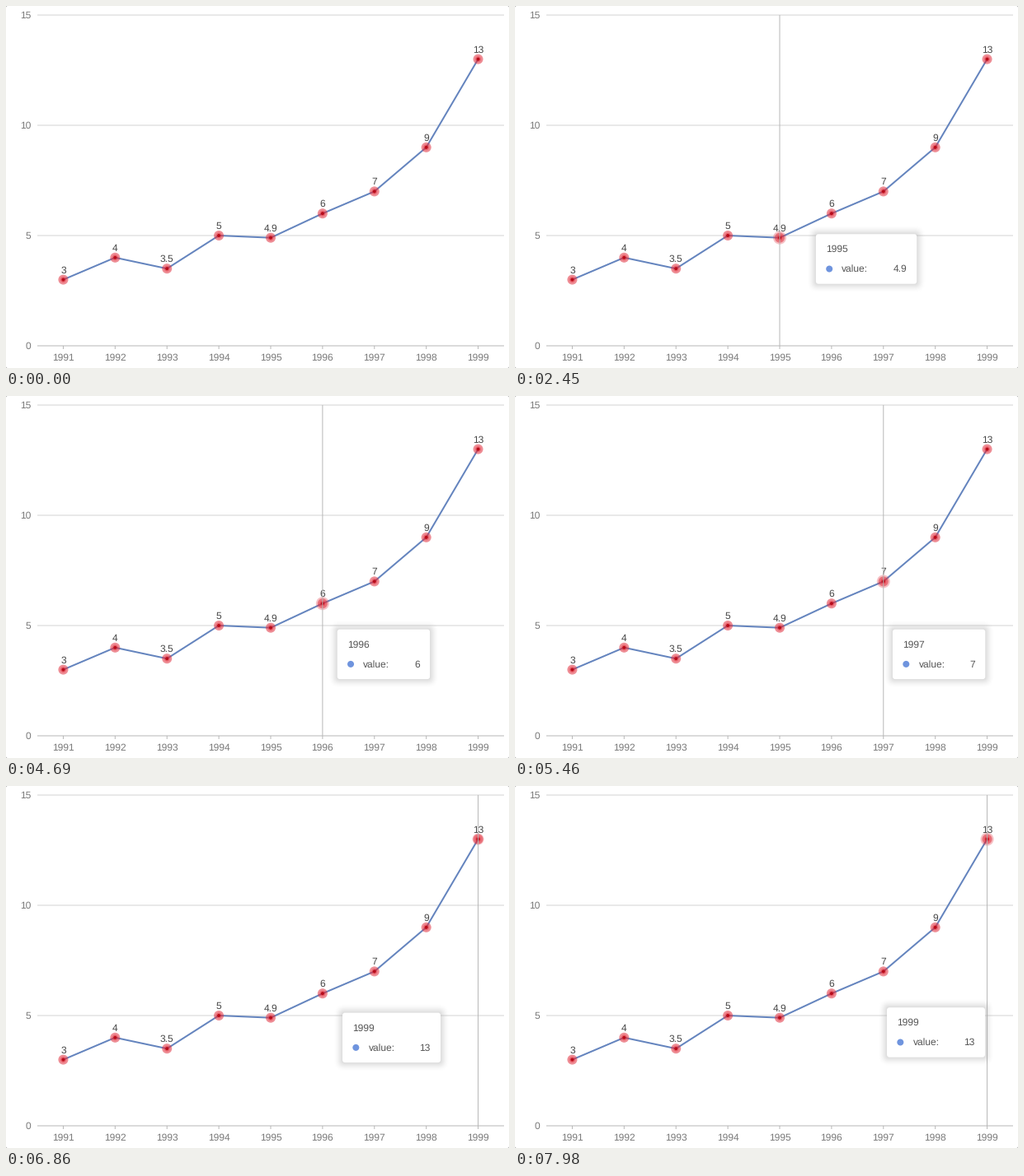
Write a matplotlib script that moves like this. It is 610x440 px and loops after 8 s.

```python
import numpy as np
import matplotlib.pyplot as plt
from matplotlib.animation import FuncAnimation
from matplotlib.patches import Circle, FancyBboxPatch, Polygon
from matplotlib.transforms import Affine2D

W, H, DPI = 610, 440, 100
LOOP, STEP = 8000, 40
PX = 72 / DPI  # points per pixel

LEFT, RIGHT, TOP, BASE = 38, 604, 11, 413
VALUES = np.array([3, 4, 3.5, 5, 4.9, 6, 7, 9, 13])
GAP = (RIGHT - LEFT) / len(VALUES)
XS = LEFT + GAP * (np.arange(len(VALUES)) + 0.5)
FIRST_YEAR = 1991

TIP_W, TIP_H, DIGIT, OFFSET = 112.3, 60.5, 6.67, 20

# pointer: time, x, and height of the tooltip's top edge
MOUSE_T, MOUSE_X, TIP_TOP = zip(
    (910, 140, 272), (1610, 262, 274.6), (3220, 419, 279.6),
    (4690, 381, 283.6), (5460, 438, 283.6), (6860, 547, 275.6),
    (7500, 590, 269.2))

plt.rcParams.update({
    "font.family": "Liberation Sans",
    "font.size": 12 * PX,
    "text.hinting": "none",
    "toolbar": "None",
})

fig = plt.figure(figsize=(W / DPI, H / DPI), dpi=DPI, facecolor="white")
ax = fig.add_axes([0, 0, 1, 1])
ax.set_xlim(0, W)
ax.set_ylim(H, 0)
ax.axis("off")


def level(v):
    return BASE - (BASE - TOP) / 15 * v


def line(xs, ys, color, width=1, z=1, **kw):
    return ax.plot(xs, ys, color=color, lw=width * PX, zorder=z, snap=False,
                   solid_capstyle="butt", **kw)[0]


def disc(x, y, r, color, z, alpha=1):
    return ax.add_patch(Circle((x, y), r, fc=color, ec="none", alpha=alpha,
                               zorder=z))


def label(x, y, s, color, ha="center", z=6):
    return ax.text(x, y, s, color=color, ha=ha, va="baseline", zorder=z)


# axes and grid
for v in range(0, 16, 5):
    line([LEFT, RIGHT], [level(v)] * 2, "#d4d4d4" if v else "#b8b8b8")
    label(30.2, level(v) + 4.2, str(v), "#7a7a7a", "right")
for i, x in enumerate(XS):
    line([x, x], [BASE, BASE + 4], "#b8b8b8")
    label(x, 430.4, str(FIRST_YEAR + i), "#7a7a7a")

# rounded window corners
for cx, sx in ((0, 1.5), (W, -1.5)):
    for cy, sy in ((0, 1.5), (H, -1.5)):
        ax.add_patch(Polygon([(cx, cy), (cx + sx, cy), (cx, cy + sy)],
                             fc="#b4b4b4", ec="none"))

# series: translucent dots let the line show through
YS = level(VALUES)
line(XS, YS, "#6484be", 2, z=2, solid_joinstyle="round")
for x, y, v in zip(XS, YS, VALUES):
    disc(x, y, 6, "#e0303e", 3, 0.55)
    disc(x, y, 3.6, "#e8202e", 4, 0.35)
    disc(x, y, 2, "#b80c1a", 5)
    label(x, y - 8, f"{v:g}", "#464646")

# hover marks
halo = disc(0, 0, 6, "#e0303e", 2.5, 0.3)
cross = line([0, 0], [TOP, BASE], "#b8b8b8", z=7)

# tooltip, drawn at the origin and shifted
shift = Affine2D()
place = shift + ax.transData


def box(pad, color, alpha):
    p = FancyBboxPatch((-pad, -pad), TIP_W + 2 * pad, TIP_H + 2 * pad,
                       boxstyle=f"round,pad=0,rounding_size={3 + pad}",
                       fc=color, ec="none", alpha=alpha, zorder=8)
    return pad, ax.add_patch(p)


boxes = [box(d, "#aeaeae", 0.075 * np.exp(-d * d / 50))
         for d in range(10, -1, -1)]
boxes.append(box(0, "white", 1))
bullet = disc(16.3, 42.3, 4, "#6f94de", 10)
title = label(12.2, 22, "", "#555555", "left", 10)
name = label(31.5, 46, "value:", "#555555", "left", 10)
number = label(0, 46, "", "#555555", "right", 10)

tip = [p for _, p in boxes] + [bullet, title, name, number]
for part in tip:
    part.set_transform(place)
hover = tip + [halo, cross]


def pointer(t):
    return np.interp(t, MOUSE_T, MOUSE_X)


def nearest(t):
    return int((pointer(t) - LEFT) // GAP)


def draw(n):
    t = (n + 0.5) * STEP
    shown = t >= MOUSE_T[0]
    for part in hover:
        part.set_visible(shown)
    if not shown:
        return hover

    # the halo grows with the share of the last 160 ms spent on this point
    i, mouse = nearest(t), pointer(t)
    grow = np.mean([nearest(t - d) == i for d in range(0, 160, 10)])
    halo.center = XS[i], YS[i]
    halo.set_radius(6 + 2 * grow)
    cross.set_xdata([XS[i], XS[i]])

    text = f"{VALUES[i]:g}"
    digits = len(text) - 0.5 * ("." in text)
    width = TIP_W + DIGIT * (digits - 1)
    for pad, p in boxes:
        p.set_width(width + 2 * pad)
    title.set_text(str(FIRST_YEAR + i))
    number.set_text(text)
    number.set_x(width - 12.2)

    # slide to the pointer's other side when the right edge is near
    room = W - TIP_W - OFFSET
    side = np.clip((mouse - room) / 20, 0, 1)
    side = side * side * (3 - 2 * side)
    left = mouse + OFFSET - side * (width + 2 * OFFSET)
    shift.clear().translate(left, np.interp(t, MOUSE_T, TIP_TOP))
    return hover


anim = FuncAnimation(fig, draw, frames=LOOP // STEP, interval=STEP,
                     init_func=lambda: draw(0), repeat=True, repeat_delay=0,
                     blit=False)
plt.show()
```
